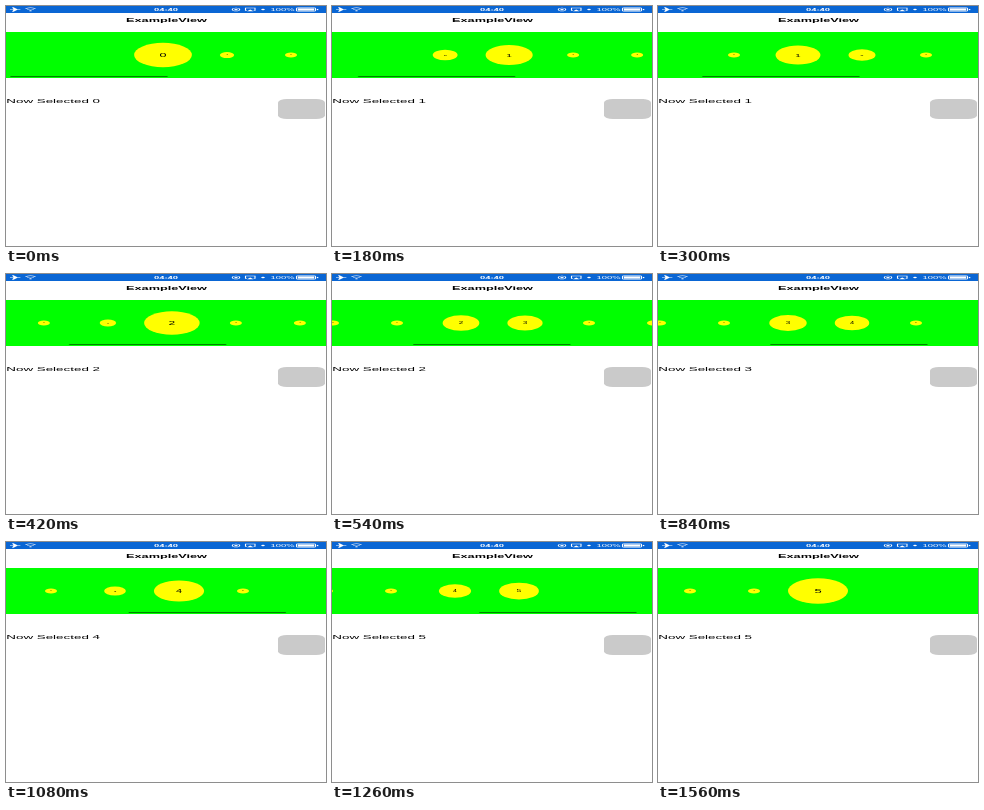
Animation, 320 px wide and 240 px high, one loop 1.62 s. Source, as an HTML page:

```html
<!DOCTYPE html>
<html lang="en">
<head>
<meta charset="utf-8">
<title>ExampleView</title>
<style>
  html, body { margin: 0; width: 100%; height: 100%; overflow: hidden; background: #fff; }
  svg { display: block; width: 100%; height: 100%; }
  text { font-family: "Liberation Sans", Arial, sans-serif; }
  .mid { text-anchor: middle; }
  .status { font-size: 9.4px; fill: #fff; }
  .line { fill: none; stroke: #fff; stroke-width: 1.1; }
</style>
</head>
<body>
<!-- A tall phone screen, squeezed to the stage -->
<svg viewBox="0 0 320 569" preserveAspectRatio="none">
  <defs>
    <clipPath id="strip"><rect y="61.6" width="320" height="109.1"/></clipPath>
  </defs>
  <rect width="320" height="569" fill="#fff"/>

  <rect width="320" height="16.6" fill="#0a66d4"/>
  <g class="status">
    <path fill="#fff" d="M4 7.5h3.5L6 3h1.5l4 4.5h2.5q1.500 .8 0 1.600h-2.500l-4 4.500H6l1.500-4.500H4z"/>
    <path class="line" d="M19.500 6.500q5-4.500 10 0M21.300 8.800q3.200-2.800 6.400 0"/>
    <circle cx="24.500" cy="11.200" r="1.300" fill="#fff"/>
    <text class="mid" x="160" y="11.700" font-weight="bold">04:40</text>
    <circle class="line" cx="230" cy="8.300" r="3.700"/>
    <rect x="228.500" y="7.300" width="3" height="2.800" fill="#fff"/>
    <path class="line" d="M241 10.500h-1.500v-6h9.500v6h-1.500"/>
    <path fill="#fff" d="M241 12.500h6.500l-3.250-4z"/>
    <circle cx="257" cy="8.300" r="1.800" fill="#fff"/>
    <text x="264.500" y="11.700">100%</text>
    <rect class="line" x="290.500" y="4.300" width="19" height="8" rx="1.500"/>
    <rect x="291.800" y="5.500" width="16.400" height="5.600" fill="#fff"/>
    <rect x="310.800" y="7" width="1.500" height="2.800" fill="#fff"/>
  </g>

  <text class="mid" x="160.500" y="38" font-size="12.700" font-weight="bold">ExampleView</text>

  <g clip-path="url(#strip)">
    <rect y="61.6" width="320" height="109.1" fill="#0f0"/>
    <g id="balls"></g>
    <rect id="bar" y="166.300" width="158" height="2" rx="1" fill="#000" fill-opacity=".65"/>
  </g>

  <text id="label" x="0.300" y="230" font-size="13.400">Now Selected 0</text>
  <rect x="272" y="220.500" width="47" height="47.400" rx="9" fill="#cacaca"/>
</svg>
<script>
  const LOOP = 1620, TICK = 60, GAP = 64, COUNT = 6;
  const svgNS = "http://www.w3.org/2000/svg";
  const $ = id => document.getElementById(id);

  // time, scroll offset, speed
  const keys = [
    [0, 3, .15], [300, 84, .3], [540, 159, .28], [840, 222, .12],
    [1080, 243, .15], [1260, 293, .24], [1440, 320, 0], [LOOP, 320, 0]
  ];

  function scrollAt(t) {
    const i = keys.findIndex(k => t < k[0]);
    const [t0, s0, v0] = keys[i - 1], [t1, s1, v1] = keys[i];
    const d = t1 - t0, u = (t - t0) / d, w = 1 - u;
    return s0 * w * w * (1 + 2 * u) + s1 * u * u * (3 - 2 * u)
         + d * u * w * (v0 * w - v1 * u);
  }

  function add(parent, tag, attrs) {
    const el = document.createElementNS(svgNS, tag);
    for (const name in attrs) el.setAttribute(name, attrs[name]);
    return parent.appendChild(el);
  }

  const balls = Array.from({ length: COUNT }, (_, i) => {
    const g = add($("balls"), "g", {});
    add(g, "circle", { r: 30, fill: "#ff0" });
    add(g, "text", { class: "mid", y: 4.7, "font-size": 13 }).textContent = i;
    return g;
  });

  function draw(now) {
    const t = Math.floor(now % LOOP / TICK) * TICK;
    const s = scrollAt(t);
    balls.forEach((g, i) => {
      const x = GAP * i - s;
      const size = Math.max(.2, 1 - .8 * Math.abs(x) / GAP);
      g.setAttribute("transform", `translate(${160 + x} 116.2) scale(${size})`);
    });
    $("bar").setAttribute("x", 2.5 + .493 * s);
    $("bar").setAttribute("opacity", t < 1560 ? 1 : 0);
    $("label").textContent = "Now Selected " + Math.round(s / GAP);
  }

  const start = performance.now();
  function frame() {
    draw(performance.now() - start);
    requestAnimationFrame(frame);
  }
  frame();
</script>
</body>
</html>
```
